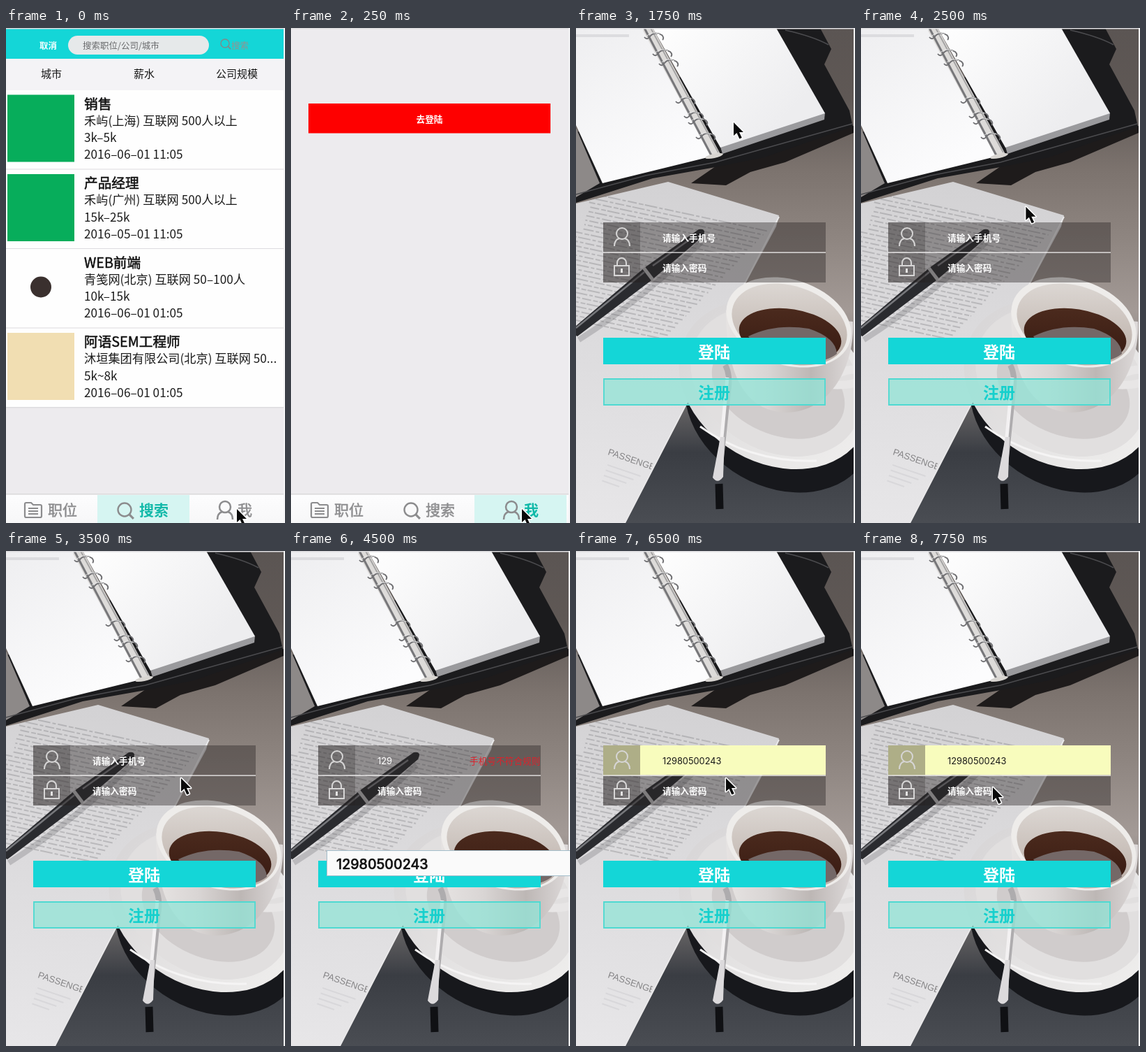
Animation of 400x708 px, one loop 8000 ms. Source, as an HTML page with a canvas:

```html
<!DOCTYPE html>
<html lang="zh-CN">
<head>
<meta charset="utf-8">
<style>
html, body { margin: 0; width: 100%; height: 100%; overflow: hidden; background: #fff; }
canvas { display: block; width: 400px; height: 708px; }
</style>
</head>
<body>
<canvas id="stage" width="400" height="708"></canvas>
<script>
const W = 400, H = 708, LOOP = 8000, STEP = 250;
const CJK = '"Noto Sans CJK SC", "Noto Sans CJK", sans-serif';
const LATIN = 'Inter, sans-serif';
const TEAL = '#14d6d7', PAGE = '#edebee';
const PHONE = '12980500243';

// Hard changes, in ms
const ACCOUNT = 250, LOGIN = 1750, TYPING = 3750, PREVIEW = 4750, ACCEPTED = 5500, POINTER_BACK = 6250;

const screen = document.getElementById('stage').getContext('2d');
let c = screen;

function rect(x, y, w, h, fill) {
  c.fillStyle = fill;
  c.fillRect(x, y, w, h);
}
function shape(d, fill) {
  c.fillStyle = fill;
  c.fill(new Path2D(d));
}
function line(d, color, width = 1) {
  c.strokeStyle = color;
  c.lineWidth = width;
  c.stroke(new Path2D(d));
}
function oval(x, y, rx, ry, deg, fill) {
  c.beginPath();
  c.ellipse(x, y, rx, ry, deg * Math.PI / 180, 0, 7);
  c.fillStyle = fill;
  c.fill();
}
function ring(x, y, r, color, width) {
  c.beginPath();
  c.arc(x, y, r, 0, 7);
  c.strokeStyle = color;
  c.lineWidth = width;
  c.stroke();
}
// Weight 500 is a regular face thickened by a hairline
function text(s, x, y, size, color, weight = 400, align = 'left', family = CJK) {
  c.font = `${weight} ${size}px ${family}`;
  c.textAlign = align;
  c.fillStyle = color;
  c.fillText(s, x, y);
  if (weight !== 500) return;
  c.strokeStyle = color;
  c.lineWidth = .5;
  c.strokeText(s, x, y);
}
function gradient(x0, y0, x1, y1, ...colors) {
  const g = c.createLinearGradient(x0, y0, x1, y1);
  colors.forEach((color, i) => g.addColorStop(i / (colors.length - 1), color));
  return g;
}
function frameEdges() {
  rect(0, 0, W, 1.5, '#dcdbde');
  rect(398, 0, 2, H, '#f4f4f6');
}

// Navigation bar

function person(x, y, color, width) {
  ring(x, y - 5, 8, color, width);
  line(`M${x - 11} ${y + 13}q0-9 7-11M${x + 11} ${y + 13}q0-9-7-11`, color, width);
}
function magnifier(x, y, r, color, width) {
  ring(x, y, r, color, width);
  line(`M${x + r * .7} ${y + r * .7}l${r * .65} ${r * .65}`, color, width * 1.3);
}
function navBar(active, dx) {
  const grey = '#8c8c8e';
  rect(0, 666, 398, 42, gradient(0, 666, 0, 708, '#fdfdfe', '#f7f7f8'));
  rect(0, 666, 398, 1.5, '#d9d8da');
  rect(131 + (active - 1) * 132, 668, 132, 40, '#d6f5f2');
  c.save();
  c.translate(dx, 0);
  line('M27 698V681q0-2 2-2h7l3 3h10q2 0 2 2v14q0 2-2 2H29q-2 0-2-2zM32 687h14M32 691h14M32 695h14', grey, 2.2);
  magnifier(170, 689, 9.5, grey, 2.4);
  person(314, 690, grey, 2.5);
  ['职位', '搜索', '我'].forEach((label, i) => {
    const on = i === active;
    text(label, [60, 191, 332][i], 697, 21, on ? '#12b9a9' : grey, on ? 700 : 500);
  });
  c.restore();
}

// Job list

const jobs = [
  ['销售', '禾屿(上海) 互联网 500人以上', '3k–5k', '2016–06–01 11:05'],
  ['产品经理', '禾屿(广州) 互联网 500人以上', '15k–25k', '2016–05–01 11:05'],
  ['WEB前端', '青笺网(北京) 互联网 50–100人', '10k–15k', '2016–06–01 01:05'],
  ['阿语SEM工程师', '沐垣集团有限公司(北京) 互联网 50...', '5k~8k', '2016–06–01 01:05'],
];
function jobMark(i, y) {
  if (i === 2) oval(50, y + 48, 15, 15, 0, '#3a302e');
  else rect(2, y, 96, 96, i === 3 ? '#f1deb2' : '#07ad5b');
}
function listPage() {
  rect(0, 0, W, H, PAGE);
  rect(0, 1, 398, 43, TEAL);
  text('取消', 48, 30, 12.5, '#f4ffff', 700);
  c.beginPath();
  c.roundRect(89, 11, 202, 27, 13.5);
  c.fillStyle = '#e6e9ea';
  c.fill();
  text('搜索职位/公司/城市', 110, 30, 12.5, '#68696b');
  magnifier(314, 22, 6, '#7f8b8b', 1.4);
  text('搜索', 323, 30, 12.5, '#98908e');
  rect(0, 44, 398, 45, '#f4f3f6');
  ['城市', '薪水', '公司规模'].forEach((label, i) =>
    text(label, 65 + i * 133, 71, 15, '#161616', 400, 'center'));
  jobs.forEach((job, i) => {
    const y = 89 + i * 113.5;
    rect(0, y, 398, 113.5, '#fefefe');
    rect(0, y + 112.5, 398, 1.5, '#dddcdf');
    jobMark(i, y + 6.5);
    text(job[0], 112, y + 26.5, 19.7, '#111', 500);
    for (let k = 1; k < 4; k++) text(job[k], 112, y + 25.5 + k * 24.3, 17.2, '#1b1b1b');
  });
  navBar(1, 0);
  frameEdges();
}

function accountPage() {
  rect(0, 0, W, H, PAGE);
  rect(25, 108, 347, 42.5, '#fe0000');
  text('去登陆', 198.5, 134.5, 12.7, '#fff', 700, 'center');
  navBar(2, 2);
  frameEdges();
}

// Desk backdrop, painted once

function notebook() {
  shape('M165 222L200 198L398 140V150L300 192L250 206L215 225Z', '#1e1b1b');
  shape('M0 150V250L110 215L200 199L270 185L397 141L392 118L356 52L366 30L350 0H280Z', '#1b1b1d');
  shape('M0 143V242L34 222Z', '#8d8988');
  line('M300 3Q340 12 362 24M0 238L100 211L200 192L396 137', '#4b4b4e', 1.5);
  const leftPage = 'M0 0H97L205 181L38 222L0 139Z';
  shape(leftPage, gradient(0, 0, 130, 200, '#eeeef0', '#fcfcfd'));
  shape('M207 170L357 121L356 131L210 180Z', '#9a9a9d');
  shape('M110 0H287L357 122L207 171Z', gradient(120, 0, 280, 150, '#fefefe', '#ededef'));
  rect(0, 9, 76, 4, '#dcdcdf');
  line('M102 0L200 182', '#dddbd9', 14);
  line('M98 0L195 184', '#77777a', 3);
  line('M107 0L204 178', '#a5a4a4', 2);
  for (const [x, y] of [[110, 8], [122, 32], [131, 46], [155, 100], [167, 121], [173, 130], [184, 151]]) {
    line(`M${x - 12} ${y + 5}q4 5 8-1q7-8 17-2q4 4 1 7`, '#6f6f72', 1.9);
    line(`M${x - 8} ${y + 3}q7-7 18-2`, '#e8e8e8', 1);
  }
  oval(198, 183, 13, 3, -12, '#d8d5d1');
}

function papers() {
  const sheet = 'M0 251L132 220L291 268L287 284L222 404L157 540L70 708H0Z';
  shape(sheet, gradient(90, 220, 40, 708, '#d3d2d4', '#dddcde', '#e7e6e8'));
  c.save();
  c.clip(new Path2D(sheet));
  c.translate(0, 232);
  c.rotate(.21);
  c.setLineDash([13, 3, 7, 2, 18, 3, 5, 3]);
  for (let i = 0; i < 29; i++) {
    c.lineDashOffset = i * 17;
    line(`M${i < 9 ? 22 : 0} ${i * 6.5}H${280 - i * 4}`, 'rgba(80,80,86,.24)', 2);
  }
  c.restore();
  line('M291 270L222 404L157 540L70 708', '#e9e8e9', 2);
  c.save();
  c.translate(45, 610);
  c.rotate(.33);
  c.beginPath();
  c.rect(0, -14, 66, 80);
  c.clip();
  text('PASSENGER', 0, 0, 13, '#858486', 400, 'left', '"Liberation Sans", sans-serif');
  for (let i = 0; i < 4; i++) line(`M5 ${14 + i * 8}h${50 - i * 8}`, 'rgba(110,110,115,.1)', 2);
  c.restore();
  line('M4 446Q90 392 180 306', 'rgba(50,50,55,.2)', 8);
  shape('M0 426L98 343L176 288Q188 286 182 298L108 361L2 441Q-4 440 0 426Z', '#2a2b2f');
  line('M0 429L98 349M110 340L168 299', '#77787c', 2.5);
  line('M97 343L110 360', '#b9b8ba', 5);
}

function saucer() {
  oval(285, 510, 145, 112, 30, gradient(170, 430, 380, 630, '#d9d7d8', '#eeedec'));
  oval(287, 506, 130, 98, 30, '#e1dfdf');
  oval(290, 515, 100, 66, 24, '#d0cccc');
  line('M178 570Q250 622 345 619', '#f5f4f4', 3);
}
function coffeeCup() {
  line('M376 494Q405 482 412 498Q408 513 362 510', '#e8e6e6', 12);
  shape('M215 404C215 483 235 547 300 550C368 550 400 478 397 420Z',
    gradient(215, 0, 398, 0, '#e6e3e2', '#d9d5d4', '#bdb7b5', '#dedada'));
  oval(305, 421, 92, 61, 18, '#eeecea');
  oval(306, 424, 85, 55, 18, gradient(0, 365, 0, 470, '#dcd7d3', '#bdb1aa'));
  oval(307, 440, 74, 38, 9, gradient(0, 402, 0, 478, '#4b2a1d', '#371a12'));
  shape('M247 441Q285 422 334 430Q373 443 374 466Q352 483 308 476Q262 464 247 441Z', '#746867');
}
function spoon() {
  line('M205 652L206 688', '#101114', 11);
  line('M214 482Q222 497 218 520L206 634', '#aeacae', 8);
  line('M217 500L204 638', '#f3f1f2', 5);
  shape('M207 585L196 643Q203 653 211 642L213 585Z', '#dcdadc');
}

function paintDesk() {
  const layer = document.createElement('canvas');
  layer.width = W;
  layer.height = H;
  c = layer.getContext('2d');
  rect(0, 0, W, H, gradient(0, 0, 0, H,
    '#5b5553', '#5f5855', '#7c736e', '#8f8681', '#a39a96', '#7d7876', '#3a3d43', '#4a4d53'));
  notebook();
  oval(292, 544, 143, 112, 30, '#17181c');
  papers();
  saucer();
  coffeeCup();
  spoon();
  c.filter = 'blur(.7px)';
  c.drawImage(layer, 0, 0);
  c = screen;
  return layer;
}
const desk = paintDesk();

// Login form

function lock() {
  line('M55 340h21v14h-21zM59 340v-4a6.5 7 0 0 1 13 0v4', '#d6d5d5', 2);
  line('M65.5 344v6', '#e4e3e3', 3);
}
function fieldBox(y, yellow) {
  rect(39, y, 319, 42.5, yellow ? '#f8fcbd' : 'rgba(38,34,34,.4)');
  rect(39, y, 53, 42.5, yellow ? '#aeae87' : 'rgba(38,34,34,.25)');
}
function phoneField(t) {
  const filled = t >= PREVIEW;
  fieldBox(278, filled);
  person(66, 299, '#d6d5d5', 2);
  if (t < TYPING) {
    text('请输入手机号', 124, 304.5, 12.7, '#fff', 700);
    return;
  }
  const typed = PHONE.slice(0, Math.min(3, 1 + (t - TYPING) / STEP));
  c.font = `400 12.8px ${LATIN}`;
  if (filled && t < ACCEPTED) {
    const x = 124 + c.measureText(typed).width;
    rect(x, 292, 124 + c.measureText(PHONE).width - x, 16, '#9ccabb');
  }
  text(filled ? PHONE : typed, 124, 304.5, 12.8, filled ? '#181818' : '#fff', 400, 'left', LATIN);
  if (t < ACCEPTED) text('手机号不符合规则', 256, 305, 12.7, '#e0202a');
}
function popup(t) {
  rect(51, 428, 349, 37, '#a3bdca');
  rect(52, 429, 348, 35, t < PREVIEW ? '#fafafa' : gradient(0, 429, 0, 464, '#b9dbf1', '#acd3ec'));
  text(PHONE, 65, 455, 19.6, '#111', 500, 'left', LATIN);
}
function loginPage(t) {
  c.drawImage(desk, 0, 0);
  phoneField(t);
  fieldBox(321.5, false);
  rect(39, 320.5, 319, 1.3, '#e5e3e3');
  lock();
  text('请输入密码', 124, 348, 12.7, '#fff', 700);
  rect(39, 443, 319, 38, TEAL);
  text('登陆', 198, 471.5, 23, '#fff', 700, 'center');
  rect(39, 501, 319, 39, 'rgba(146,228,215,.75)');
  line('M40 502h317v37h-317z', '#4fd9d1', 1.8);
  text('注册', 198, 529.5, 23, '#16d0cd', 700, 'center');
  frameEdges();
  if (t >= TYPING && t < ACCEPTED) popup(t);
}

// Pointer: time, x, y

const track = [
  [0, 331, 688], [250, 331, 688], [1250, 226, 135], [2000, 226, 135], [2750, 240, 298],
  [3500, 251, 325], [6000, 225, 312], [6500, 215, 325], [7500, 189, 338], [8000, 189, 338],
];
function pointer(t) {
  if (t >= TYPING && t < POINTER_BACK) return;
  const i = track.findIndex(p => p[0] > t);
  const [t0, x0, y0] = track[i - 1], [t1, x1, y1] = track[i];
  const u = (t - t0) / (t1 - t0), k = u * u * (3 - 2 * u);
  const arrow = 'M0 0V19L4.5 15L8.3 23.5L11.8 22L8 14H14Z';
  c.save();
  c.translate(x0 + (x1 - x0) * k, y0 + (y1 - y0) * k);
  c.lineJoin = 'round';
  line(arrow, '#fff', 3);
  shape(arrow, '#0a0a0a');
  c.restore();
}

function draw(now) {
  const t = Math.floor((now % LOOP) / STEP) * STEP;
  if (t < ACCOUNT) listPage();
  else if (t < LOGIN) accountPage();
  else loginPage(t);
  pointer(t);
  requestAnimationFrame(draw);
}
requestAnimationFrame(draw);
</script>
</body>
</html>
```
